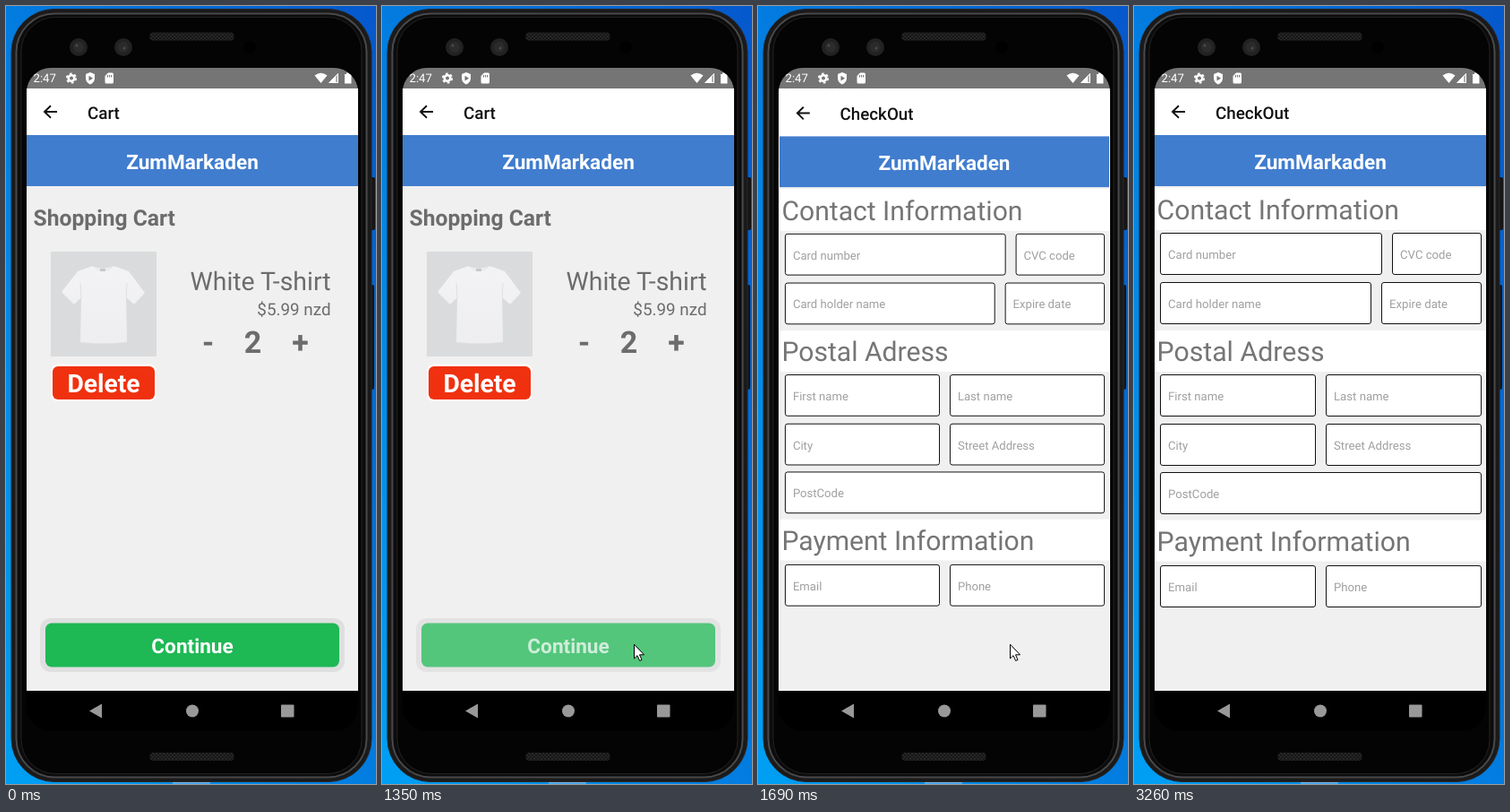
An HTML page for the animation above (3320 ms loop, 413 px wide and 868 px high).

```html
<!DOCTYPE html>
<html lang="en">
<head>
<meta charset="utf-8">
<title>Cart to checkout</title>
<style>
  html, body { margin: 0; width: 100%; height: 100%; overflow: hidden; background: #0670d4; }
  svg { display: block; width: 100%; height: 100%; }
  text { font-family: Roboto, sans-serif; text-rendering: geometricPrecision; }
  .bold { font-weight: 700; }
  .title { font-weight: 500; font-size: 18.83px; fill: #111; }
  .brand { font-size: 22.6px; fill: #fff; text-anchor: middle; }
  .heading { font-size: 30.25px; fill: #757575; }
  .hint { font-size: 13.18px; fill: #a0a0a0; }
  .grey { fill: #6c6c6c; }
  .mid { text-anchor: middle; }
  .end { text-anchor: end; }
</style>
</head>
<body>
<svg viewBox="0 0 413 868" preserveAspectRatio="none">
  <defs>
    <linearGradient id="desk" y1="1" y2="0"><stop stop-color="#00a0f4"/><stop offset="1" stop-color="#0558cc"/></linearGradient>
    <linearGradient id="cloth" x2="0" y2="1"><stop stop-color="#f3f3f5"/><stop offset="1" stop-color="#eeeef0"/></linearGradient>
    <pattern id="mesh" width="4" height="4" patternUnits="userSpaceOnUse">
      <rect width="4" height="4" fill="#262626"/><path d="M0 0L4 4M4 0L0 4" stroke="#171717"/>
    </pattern>
    <clipPath id="screen"><rect x="23" y="69" width="370" height="740" rx="27"/></clipPath>
    <clipPath id="app"><rect x="23" y="92" width="370" height="672"/></clipPath>
    <g id="bar">
      <rect x="23" y="92" width="370" height="53" fill="#fff"/>
      <path d="M57 118H43.5M50 111.2L43 118L50 124.8" fill="none" stroke="#111" stroke-width="1.9"/>
      <rect x="23" y="144" width="370" height="57" fill="#417dce"/>
      <text class="brand bold" x="208" y="182">ZumMarkaden</text>
    </g>
  </defs>

  <rect width="413" height="868" fill="url(#desk)"/>

  <!-- phone body -->
  <g fill="#151516">
    <rect x="404" y="191" width="8" height="59" rx="2"/>
    <rect x="404" y="311" width="7" height="117" rx="2"/>
  </g>
  <rect x="6" y="3.5" width="402" height="862" rx="48" fill="#1a1a1b" stroke="#29292b"/>
  <rect x="11.5" y="8.5" width="391" height="852" rx="43" fill="#0c0c0d" stroke="#49494c" stroke-width="2"/>
  <rect x="17" y="12.5" width="380" height="844" rx="38" fill="#040404" stroke="#222"/>
  <rect x="186" y="866" width="42" height="1.5" fill="#79b4ea"/>
  <g fill="url(#mesh)">
    <rect x="160.5" y="29.5" width="94" height="9" rx="4"/>
    <rect x="160.5" y="833" width="94" height="9" rx="4"/>
  </g>
  <g fill="#222">
    <circle cx="81" cy="46" r="10"/><circle cx="131" cy="46" r="10"/>
    <g fill="#2b2b2b"><circle cx="81" cy="46" r="6"/><circle cx="131" cy="46" r="6"/></g>
    <g fill="#4b4b4b"><circle cx="79" cy="44" r="1.500"/><circle cx="132" cy="47" r="1.500"/></g>
  </g>
  <circle cx="272" cy="46" r="7" fill="#000"/>

  <g clip-path="url(#screen)">
    <rect x="23" y="69" width="370" height="740" fill="#000"/>
    <g clip-path="url(#app)">
      <rect x="23" y="92" width="370" height="672" fill="#fff"/>

      <g id="cart">
        <rect x="23" y="92" width="370" height="672" fill="#f0f0f0"/>
        <use href="#bar"/>
        <text class="title" x="91" y="125.5">Cart</text>
        <text class="bold grey" x="30.5" y="244.5" font-size="24.65">Shopping Cart</text>
        <rect x="50" y="274" width="118" height="117" fill="#dadbdd"/>
        <path d="M97 290Q108 296 120 290L137 296L155 320L143 333L134 325L135 375Q109 378 83 375L84 325L76 333L62 319L80 296Z" fill="url(#cloth)"/>
        <path d="M97 290Q108 301 120 290M84 325L83 309M134 325L135 309" fill="none" stroke="#e0e0e3"/>
        <rect x="105" y="293" width="6" height="3" fill="#c9cacd"/>
        <rect x="50" y="399.5" width="118" height="41.5" rx="8" fill="#fff"/>
        <rect x="52" y="402" width="114" height="37" rx="6" fill="#f0310f"/>
        <text class="bold mid" x="109" y="431" font-size="28.25" fill="#fff">Delete</text>
        <text class="grey end" x="362.5" y="317" font-size="28.4">White T-shirt</text>
        <text class="grey end" x="362.5" y="345" font-size="18.83">$5.99 nzd</text>
        <g class="bold grey mid" font-size="33.9">
          <text x="225.5" y="387">-</text><text x="275.5" y="387">2</text><text x="328.5" y="387">+</text>
        </g>
        <g id="continue">
          <rect x="38" y="683" width="340" height="60" rx="12" fill="#dfdfe0"/>
          <rect x="44" y="688.5" width="328" height="49" rx="7" fill="#1eb854"/>
          <text id="continueLabel" class="bold mid" x="208" y="722" font-size="22.6" fill="#fff">Continue</text>
        </g>
      </g>

      <g id="checkout">
        <rect x="23" y="92" width="370" height="672" fill="#f0f0f0"/>
        <use href="#bar"/>
        <text class="title" x="91" y="125.5">CheckOut</text>
        <g id="form"></g>
      </g>
    </g>

    <!-- status bar -->
    <rect x="23" y="69" width="370" height="23" fill="#757575"/>
    <text x="30.5" y="85" font-size="13.18" fill="#fff">2:47</text>
    <g fill="#fff">
      <circle cx="73" cy="80.5" r="3.3" fill="none" stroke="#fff" stroke-width="2.6"/>
      <circle cx="73" cy="80.5" r="5.2" fill="none" stroke="#fff" stroke-width="1.8" stroke-dasharray="2.7 2.745"/>
      <path d="M94 74L99 76V80.5Q99 85 94 87.5Q89 85 89 80.5V76Z"/>
      <path d="M92.5 77.8L97 80.7L92.5 83.6Z" fill="#757575"/>
      <path d="M114 74.5H118.5Q120 74.5 120 76V85Q120 86.5 118.5 86.5H112Q110.5 86.5 110.5 85V78Z"/>
      <path d="M113.5 77v2.5M115.5 77v2.5M117.5 77v2.5" stroke="#757575"/>
      <path d="M344.5 77.5Q351.5 72 358.5 77.5L351.5 86Z"/>
      <path d="M371 75V86H360Z" opacity=".45"/><path d="M368 78V86H360Z"/><path d="M370.5 75.5V85.5H361Z" fill="none" stroke="#fff"/>
      <path d="M380 74.5H383.5V76H385.5V86.5H378V76H380Z"/>
    </g>

    <!-- navigation bar -->
    <g fill="#999">
      <path d="M93 786.5L107 778.5V794.5Z"/>
      <circle cx="208" cy="786.5" r="7"/>
      <rect x="307" y="779.5" width="14.5" height="14" rx="1"/>
    </g>
  </g>

  <path id="cursor" d="M.5 1.2V17L4 13.7L6.6 19.5L9 18.5L6.5 12.8H11.5Z" fill="#fff" stroke="#000"/>
  <circle id="press" cx="281" cy="711" r="15" fill="#ff0" opacity=".5"/>
</svg>

<script>
const LOOP = 3320;
const byId = id => document.getElementById(id);
const clamp = v => Math.min(1, Math.max(0, v));
const ramp = (t, start, length) => clamp((t - start) / length);
const easeInOut = u => u < .5 ? 2 * u * u : 1 - 2 * (1 - u) ** 2;

// Form: headings as [text, band top, band height, baseline], fields as [text, left, right, top]
const headings = [
  ['Contact Information', 203, 47, 238],
  ['Postal Adress', 362, 46, 396],
  ['Payment Information', 573.5, 46, 608]
];
const fields = [
  ['Card number', 29, 276, 253], ['CVC code', 288, 387, 253],
  ['Card holder name', 29, 264, 308], ['Expire date', 276, 387, 308],
  ['First name', 29, 202, 411], ['Last name', 214, 387, 411],
  ['City', 29, 202, 466], ['Street Address', 214, 387, 466],
  ['PostCode', 29, 387, 520],
  ['Email', 29, 202, 624], ['Phone', 214, 387, 624]
];
byId('form').innerHTML =
  headings.map(([label, top, height, base]) =>
    `<rect x="23" y="${top}" width="370" height="${height}" fill="#fff"/>
     <text class="heading" x="25.5" y="${base}">${label}</text>`).join('') +
  fields.map(([label, left, right, top]) =>
    `<rect x="${left + .5}" y="${top + .5}" width="${right - left}" height="46" rx="2.5" fill="#fff" stroke="#111"/>
     <text class="hint" x="${left + 9}" y="${top + 29}">${label}</text>`).join('');

// The picture only refreshes at these moments
const ticks = [0, 530, 600, 670, 740, 810, 880, 950, 1020, 1220, 1290, 1350, 1420, 1490, 1550,
  1620, 1690, 1750, 1820, 2410, 2490, 2560, 2630, 2700, 2770, 2840, 3260];

// Pointer path: [time, x, y]
const path = [[530, 305, 767], [1020, 281, 711], [2340, 281, 711], [2410, 349, 775],
  [2560, 376, 818], [2630, 379, 835], [2840, 362, 867]];

function pointer(t) {
  const i = path.findIndex(p => p[0] >= t);
  if (i < 0) return path[path.length - 1].slice(1);
  if (i === 0) return path[0].slice(1);
  const [t0, x0, y0] = path[i - 1], [t1, x1, y1] = path[i];
  const u = (t - t0) / (t1 - t0);
  return [x0 + (x1 - x0) * u, y0 + (y1 - y0) * u].map(Math.round);
}

const zoom = s => `translate(208 416) scale(${s}) translate(-208 -416)`;
const show = (node, visible) => node.setAttribute('visibility', visible ? 'visible' : 'hidden');

function draw(t) {
  const p = 1 - (1 - ramp(t, 1535, 230)) ** 3;
  const cart = byId('cart'), checkout = byId('checkout');
  cart.setAttribute('transform', zoom(1 + .1 * p));
  cart.setAttribute('opacity', 1 - ramp(p, .2075, .7925));
  checkout.setAttribute('transform', zoom(.85 + .15 * p));
  checkout.setAttribute('opacity', ramp(p, .6, .25));

  // The pressed button dims, and its label dims again inside it
  const dim = easeInOut(ramp(t, 1290, 150)) - easeInOut(ramp(t, 1440, 250));
  for (const id of ['continue', 'continueLabel']) byId(id).setAttribute('opacity', 1 - .8 * dim);

  byId('cursor').setAttribute('transform', `translate(${pointer(t)})`);
  show(byId('cursor'), t >= 530 && t < 3260);
  show(byId('press'), t >= 1220 && t < 1350);
}

const start = performance.now();
function frame() {
  const now = (performance.now() - start) % LOOP;
  draw(ticks.filter(tick => tick <= now).pop() ?? 0);
  requestAnimationFrame(frame);
}
frame();
</script>
</body>
</html>
```
